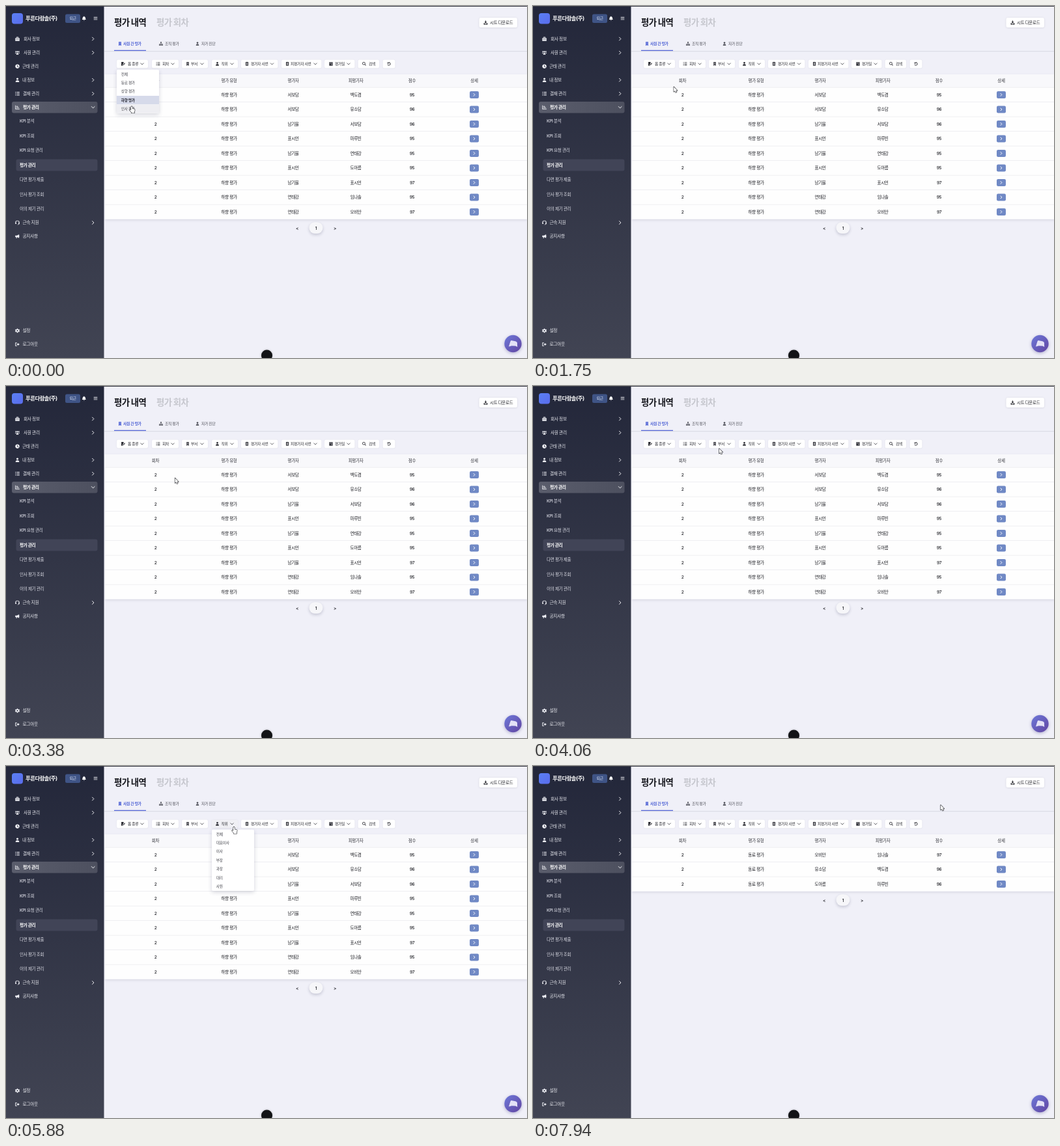
An HTML page with a canvas for the animation above (8000 ms loop, 800 by 541 pixels).

```html
<!DOCTYPE html>
<html lang="ko">
<head>
<meta charset="utf-8">
<title>평가 내역</title>
<style>
html, body { margin: 0; width: 100%; height: 100%; overflow: hidden; background: #f0f0f8; }
canvas { display: block; width: 800px; height: 541px; }
</style>
</head>
<body>
<canvas id="stage"></canvas>
<script>
const W = 800, H = 541, LOOP = 8000, STEP = 62.5;
const cv = document.getElementById('stage');
const dpr = window.devicePixelRatio || 1;
cv.width = W * dpr;
cv.height = H * dpr;
const c = cv.getContext('2d');
const FONT = 'Inter, "Noto Sans CJK KR", "Noto Sans CJK", sans-serif';

// Icons live in a 10 x 10 box
const shapes = {
  building: 'M2 0H8V10H6V7.5H4V10H2Z M3.2 1.5h1.2v1.2H3.2Z M5.6 1.5h1.2v1.2H5.6Z M3.2 4h1.2v1.2H3.2Z M5.6 4h1.2v1.2H5.6Z',
  office: 'M0 3H2.5V.5H7.5V3H10V10H0Z M3.5 2h3v1h-3Z M1.5 5h1.5v1.5H1.5Z M4.2 5h1.6v1.5H4.2Z M7 5h1.5v1.5H7Z',
  user: 'M5 0a2.4 2.4 0 1 0 .01 0Z M.8 10Q.8 5.8 4 5.8H6Q9.2 5.8 9.2 10Z',
  users: 'M5 1a1.9 1.9 0 1 0 .01 0Z M2 9.5Q2 5.5 5 5.5T8 9.5Z M1.4 1.2a1.3 1.3 0 1 0 .01 0Z M8.6 1.2a1.3 1.3 0 1 0 .01 0Z M-.5 7Q-.5 4.3 2.4 4.6L1.6 7Z M10.5 7Q10.5 4.3 7.6 4.6L8.4 7Z',
  clock: 'M5 0a5 5 0 1 0 .01 0Z M4.4 2h1.2v2.8l2 1.4-.7 1-2.5-1.8Z',
  list: 'M0 1h2v1.5H0Z M3.5 1H10v1.5H3.5Z M0 4.3h2v1.5H0Z M3.5 4.3H10v1.5H3.5Z M0 7.6h2v1.5H0Z M3.5 7.6H10v1.5H3.5Z',
  chart: 'M0 .5H1.4V8.1H10V9.5H0Z M2.6 2H6V3.4H2.6Z M2.6 4.6H8.4V6.4H2.6Z',
  headset: 'M5 0a5 5 0 0 0-5 5v3h2.5V4.8H1.5a3.5 3.5 0 0 1 7 0H7.5V8H8.2Q8 9 6 9H5v1h1.5Q9 10 9.4 8H10V5a5 5 0 0 0-5-5Z',
  horn: 'M0 3.2H4L9 .5V9L4 6.5H3.6L4.2 9.5H2.4L1.6 6.5H0Z M9.3 4h.7v1.6h-.7Z',
  gear: 'M4 0h2l.4 1.5 1.5.8 1.4-.6 1 1.8-1.1 1v1l1.1 1-1 1.8-1.4-.6-1.5.8L6 10H4l-.4-1.5-1.5-.8-1.4.6-1-1.8 1.1-1v-1l-1.1-1 1-1.8 1.4.6 1.5-.8Z M5 3.3a1.7 1.7 0 1 0 .01 0Z',
  exit: 'M0 1H4V2.3H1.4V7.7H4V9H0Z M3.5 4H6.2V1.8L10 5 6.2 8.2V6H3.5Z',
  bell: 'M4.4 0h1.2v.8Q8.4 1.4 8.4 4.5 8.4 6.6 9.6 8H.4Q1.6 6.6 1.6 4.5 1.6 1.4 4.4 .8Z M3.7 8.6H6.3Q6.2 10 5 10T3.7 8.6Z',
  burger: 'M0 1H10V2.3H0Z M0 4.3H10V5.6H0Z M0 7.6H10V8.9H0Z',
  tree: 'M3.6 0h2.8v2.8H5.6V4.4H9V6.8H10V9.6H7.2V6.8H8V5.4H5.6V6.8H6.4V9.6H3.6V6.8H4.4V5.4H2V6.8H2.8V9.6H0V6.8H1V4.4H4.4V2.8H3.6Z',
  edit: 'M0 0H6V3L3.5 7.5V10H0Z M8.5 2.5L10 4 6 9 4.2 9.8 4.8 7.8Z',
  badge: 'M1.5 0H8.5V10H1.5Z M5 2a1.4 1.4 0 1 0 .01 0Z M2.8 8Q2.8 5.6 5 5.6T7.2 8Z',
  date: 'M.5 1H2V0H3.3V1H6.7V0H8V1H9.5V10H.5Z M1.8 3H8.2V4H1.8Z M5.5 6h2v2h-2Z',
  search: 'M4 0a4 4 0 1 0 .01 0Z M4 1.3a2.7 2.7 0 1 1-.01 0Z M6.3 7.3L7.3 6.3 10 9 9 10Z',
  undo: 'M1 .5V4.5H5L3.6 3.1A2.8 2.8 0 1 1 2.5 6.5H1A4.2 4.2 0 1 0 2.5 2Z',
  save: 'M4 0H6V3.5H8.3L5 7 1.7 3.5H4Z M0 6.5H2.3L5 9 7.7 6.5H10V10H0Z'
};
const paths = {};
for (const k in shapes) paths[k] = new Path2D(shapes[k]);
const arrow = new Path2D('M0 0V7.6L1.8 6 3 8.7 4.3 8.1 3.1 5.6H5.5Z');
const hand = new Path2D('M-.9 .8Q0 -.4 .9 .8V3.8L4 4.6Q5 5 4.8 6L4.2 8.6V10.5H-.4V9.2L-3 6.2Q-3.2 5 -2 5.2L-.9 6.2Z');

// label, icon, y, text x, has chevron
const nav = [
  ['회사 정보', 'office', 50.5, 27, 1], ['사원 관리', 'users', 71.7, 27, 1],
  ['근태 관리', 'clock', 92.7, 25, 0], ['내 정보', 'user', 113.7, 25, 1],
  ['결재 관리', 'list', 134.7, 26, 1], ['평가 관리', 'chart', 155.7, 26, 0],
  ['근속 지원', 'headset', 333, 25.5, 1], ['공지사항', 'horn', 354, 25.5, 0],
  ['설정', 'gear', 499, 25.5, 0], ['로그아웃', 'exit', 520, 25.5, 0]
];
const subNav = ['KPI 분석', 'KPI 조회', 'KPI 요청 관리', '평가 관리', '다면 평가 제출', '인사 평가 조회', '이의 제기 관리'];

// left, right, icon, label, icon x, text x, chevron x
const filters = [
  [170, 218, 'edit', '폼 종류', 180, 187, 209],
  [224, 265, 'list', '회차', 233.5, 240, 256],
  [270, 310, 'building', '부서', 279, 284, 301],
  [316, 356, 'user', '직위', 324.5, 330.5, 347],
  [361, 417.5, 'badge', '평가자 사번', 370, 376, 408.5],
  [423, 484.5, 'badge', '피평가자 사번', 432, 437, 475],
  [489, 535.5, 'date', '평가일', 499, 505, 526],
  [540.5, 573, 'search', '검색', 550, 557, 0],
  [578.5, 597.5, 'undo', '', 588, 0, 0]
];
const kinds = ['전체', '동료 평가', '상향 평가', '하향 평가', '인사 평가'];
const ranks = ['전체', '대표이사', '이사', '부장', '과장', '대리', '사원'];
const menus = [
  { from: 0, to: 1440, x: 170, items: kinds, on: 3 },
  { from: 5540, to: 6310, x: 316, items: ranks, on: -1 },
  { from: 6740, to: 7130, x: 170, items: kinds, on: 3 }
];
const FILTERED = 7620;

const cols = [229.5, 342.5, 441, 537, 623.5, 719];
const heads = ['회차', '평가 유형', '평가자', '피평가자', '점수', '상세'];
const people = ['서보담', '백도겸', '유소담', '남기율', '표시언', '마루빈', '연태강', '도아름', '임나솔', '오비안'];
// rater, rated, score
const downRows = [[0, 1, 95], [0, 2, 96], [3, 0, 96], [4, 5, 95], [3, 6, 95], [4, 7, 95], [3, 4, 97], [6, 8, 95], [6, 9, 97]];
const peerRows = [[9, 8, 97], [2, 1, 96], [7, 5, 96]];

// time, x, y of the pointer
const track = [
  [0, 193, 154], [350, 193.5, 155], [860, 195.5, 145.5], [1440, 195.5, 145.5],
  [2200, 252.5, 87], [2560, 252.5, 87], [3250, 259.5, 141.5], [3500, 259.5, 141.5],
  [4150, 290, 89], [4450, 290, 89], [4860, 304, 124.5], [4960, 304, 124.5],
  [5480, 345, 89], [5820, 350, 93.5], [6310, 350, 93.5], [6680, 200, 88],
  [6800, 200, 88], [7040, 189, 116], [7140, 189, 116], [7520, 557, 88],
  [7640, 557, 88], [7900, 626, 60], [8000, 626, 60]
];

function text(s, x, y, size, color, weight = 500, align = 'left') {
  c.font = `${weight} ${size}px ${FONT}`;
  c.letterSpacing = `${-0.05 * size}px`;
  c.textAlign = align;
  c.fillStyle = color;
  c.fillText(s, x, y + size * 0.36);
}

function box(x, y, w, h, r, fill, blur = 0, dy = 0, shade = 'rgba(40,45,80,.14)') {
  c.save();
  if (blur) {
    c.shadowColor = shade;
    c.shadowBlur = blur * dpr;
    c.shadowOffsetY = dy * dpr;
  }
  c.fillStyle = fill;
  c.beginPath();
  c.roundRect(x, y, w, h, r);
  c.fill();
  c.restore();
}

function icon(name, x, y, size, color) {
  c.save();
  c.translate(x - size / 2, y - size / 2);
  c.scale(size / 10, size / 10);
  c.fillStyle = color;
  c.fill(paths[name], 'evenodd');
  c.restore();
}

function chevron(x, y, r, color, down, width = 1) {
  c.strokeStyle = color;
  c.lineWidth = width;
  c.lineCap = c.lineJoin = 'round';
  c.beginPath();
  if (down) {
    c.moveTo(x - r, y - r / 2); c.lineTo(x, y + r / 2); c.lineTo(x + r, y - r / 2);
  } else {
    c.moveTo(x - r / 2, y - r); c.lineTo(x + r / 2, y); c.lineTo(x - r / 2, y + r);
  }
  c.stroke();
}

function fade(x0, y0, x1, y1, a, b) {
  const g = c.createLinearGradient(x0, y0, x1, y1);
  g.addColorStop(0, a);
  g.addColorStop(1, b);
  return g;
}

function pointer(t) {
  let i = 1;
  while (i < track.length - 1 && track[i][0] < t) i++;
  const [t0, x0, y0] = track[i - 1], [t1, x1, y1] = track[i];
  const u = Math.min(1, Math.max(0, (t - t0) / (t1 - t0)));
  const e = u * u * (3 - 2 * u);
  return { x: x0 + (x1 - x0) * e, y: y0 + (y1 - y0) * e };
}

function drawSidebar() {
  box(0, 0, 150.5, H, 0, fade(0, 0, 0, H, '#23273a', '#414453'));
  box(9, 11, 17, 16.5, 4, fade(9, 11, 26, 27, '#5a80f4', '#5a6cec'));
  text('푸른다람솔(주)', 30, 19, 8.3, '#fff', 700);
  box(91, 12.5, 23, 13.5, 2.5, '#3f5486');
  text('퇴근', 102.7, 19.2, 5.8, '#dfe6f8', 500, 'center');
  icon('bell', 119.8, 19, 6.6, '#fff');
  icon('burger', 137.5, 19, 5.6, '#f4f4f8');

  box(9, 147, 131.5, 17.5, 3, fade(9, 0, 141, 0, '#5a5d6c', '#4d505f'));
  box(15.5, 235.5, 125, 18, 3, '#414457');
  nav.forEach(([label, name, y, x, more], i) => {
    const on = i === 5;
    icon(name, 17.5, y, 6.6, '#eeeff4');
    text(label, x, y, 6.7, on ? '#fff' : '#e9eaf0', on ? 700 : 500);
    if (more || on) chevron(133.7, y, 2.4, '#f2f2f6', on);
  });
  subNav.forEach((s, i) => {
    const on = i === 3;
    text(s, 21, 176.7 + i * 22.55, 6.6, on ? '#fff' : '#dcdde6', on ? 700 : 500);
  });
}

function drawHeader() {
  text('평가 내역', 166, 25.5, 13.4, '#16171d', 700);
  text('평가 회차', 231, 25.5, 13.4, '#c6c7ce', 700);
  box(726.5, 18, 58.5, 15, 2.5, '#fff', 3, 0.5);
  icon('save', 736.5, 25.5, 6, '#25262c');
  text('시트 다운로드', 743, 25.5, 6.5, '#25262c');

  box(151, 69, 649, 1.2, 0, '#dcdde6');
  box(166, 67.8, 49, 1.2, 0, '#5365d8');
  icon('building', 175, 58, 6.2, '#4b5fd4');
  text('사원 간 평가', 180, 58, 5.8, '#4b5fd4', 600);
  icon('tree', 238, 58, 6, '#4a4b54');
  text('조직 평가', 244, 58, 5.8, '#4a4b54');
  icon('user', 294, 58, 5.6, '#4a4b54');
  text('자가 진단', 300, 58, 5.8, '#4a4b54');
}

function drawFilters(over) {
  filters.forEach(([l, r, name, label, ix, tx, cx], i) => {
    box(l, 82.5, r - l, 13, 2.5, i === over ? '#f0f0f4' : '#fff', 2, 0.3, 'rgba(40,45,80,.1)');
    icon(name, ix, 88.8, 5.8, '#2b2c33');
    text(label, tx, 89, 5.8, '#2b2c33');
    if (cx) chevron(cx, 89, 2.2, '#3a3b42', true, 0.8);
  });
}

function drawTable(rows, kind) {
  const rowH = 22.5, top = 125.2, end = top + rows.length * rowH;
  box(151.5, 105, 648.5, end - 105, 0, '#fefefe', 4, 1.5);
  box(151.5, 105, 648.5, 20.2, 0, '#f8f8fb');
  heads.forEach((s, i) => text(s, cols[i], 115, 6.5, '#33343b', 500, 'center'));
  rows.forEach(([a, b, score], i) => {
    const y = top + i * rowH;
    box(151.5, y - 0.4, 648.5, 0.8, 0, '#e9e9ee');
    ['2', kind, people[a], people[b], String(score)].forEach((s, k) =>
      text(s, cols[k], y + 11.2, 6.6, '#1b1c22', 500, 'center'));
    box(712, y + 5.7, 14, 11, 2.2, '#7089c5');
    chevron(719, y + 11.2, 1.9, '#fff', false, 1);
  });

  const y = end + 13.6;
  text('<', 447, y, 6.6, '#25262c', 600, 'center');
  text('>', 505, y, 6.6, '#25262c', 600, 'center');
  box(465.5, y - 9, 21, 17.5, 8.7, '#f6f6f9', 4, 2, 'rgba(40,45,80,.22)');
  text('1', 476, y, 6.6, '#25262c', 600, 'center');
}

function drawMenu(menu, over) {
  box(menu.x, 97.7, 65, menu.items.length * 13.4 + 0.4, 2, '#fff', 6, 2, 'rgba(40,45,80,.2)');
  menu.items.forEach((s, i) => {
    const y = 97.9 + i * 13.4, on = i === menu.on;
    if (on || i === over) box(menu.x, y, 65, 13.2, 0, on ? '#d6daea' : '#eeeef2');
    text(s, menu.x + 6.8, y + 6.7, 5.7, on ? '#1d1e28' : '#44454d', on ? 700 : 500);
  });
}

function drawFloating() {
  box(765.3, 505.8, 26.4, 26.4, 13.2, fade(768, 508, 790, 531, '#6c74d4', '#6247a4'), 5, 1.5, 'rgba(60,50,130,.35)');
  c.fillStyle = '#e4e1f6';
  c.beginPath();
  c.moveTo(772, 523.5);
  c.lineTo(774.5, 515.5);
  c.quadraticCurveTo(775.2, 513.8, 777, 514.2);
  c.lineTo(782.2, 515.2);
  c.quadraticCurveTo(785.6, 516.2, 785, 519.4);
  c.lineTo(785.2, 524);
  c.lineTo(782.4, 522.6);
  c.lineTo(776.5, 522.2);
  c.closePath();
  c.fill();
  box(392, 528.6, 17, 17, 8.5, '#121316', 3, 0, 'rgba(0,0,0,.3)');
}

function drawPointer(p, isHand) {
  const shape = isHand ? hand : arrow;
  c.save();
  c.translate(p.x, p.y);
  c.lineJoin = 'round';
  c.lineWidth = 1.2;
  c.strokeStyle = '#25262b';
  c.stroke(shape);
  c.fillStyle = '#fff';
  c.fill(shape);
  c.restore();
}

function draw(t) {
  const p = pointer(t);
  const menu = menus.find(m => t >= m.from && t < m.to);
  const overFilter = filters.findIndex(f => p.x >= f[0] && p.x <= f[1] && p.y >= 82.5 && p.y <= 96);
  let overItem = -1;
  if (menu && p.x >= menu.x && p.x <= menu.x + 65 && p.y >= 98) {
    const i = Math.floor((p.y - 97.9) / 13.4);
    if (i < menu.items.length) overItem = i;
  }

  c.setTransform(dpr, 0, 0, dpr, 0, 0);
  box(0, 0, W, H, 0, '#f0f0f8');
  drawHeader();
  drawFilters(overFilter);
  if (t < FILTERED) drawTable(downRows, '하향 평가');
  else drawTable(peerRows, '동료 평가');
  drawSidebar();
  box(0, 0, W, 1, 0, '#3b3c45');
  if (menu) drawMenu(menu, overItem);
  drawFloating();
  drawPointer(p, overFilter >= 0 || overItem >= 0);
}

const start = performance.now();
function tick() {
  const t = (performance.now() - start) % LOOP;
  draw(Math.floor(t / STEP) * STEP);
  requestAnimationFrame(tick);
}
tick();
</script>
</body>
</html>
```
